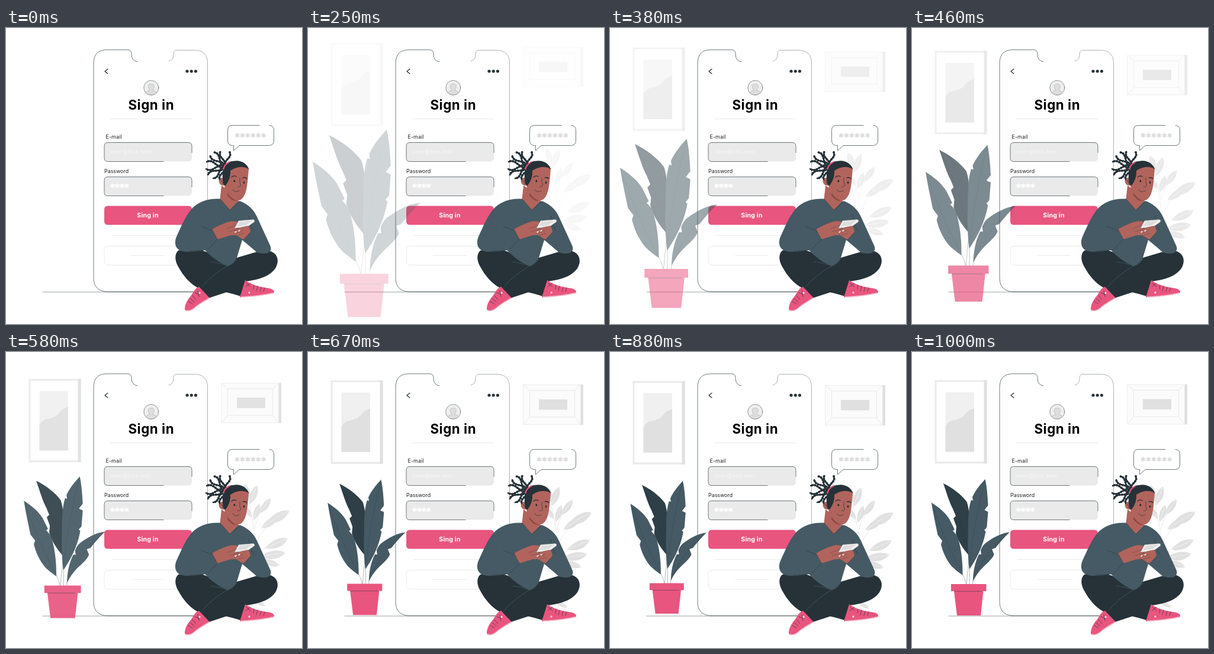
Animation of 500x500 px, one loop 1.04 s. Source, as an HTML page:

```html
<!DOCTYPE html>
<html lang="en">
<head>
<meta charset="utf-8">
<title>Sign in</title>
<style>
html, body { margin: 0; height: 100%; overflow: hidden; background: #fff }
svg { display: block; width: 100vw; height: 100vh; font-family: Inter, sans-serif }
.line { fill: none; stroke: #263238; stroke-width: .65; stroke-linecap: round; stroke-linejoin: round }
.thin { stroke-width: .5 }
.bold { stroke-width: 1.25 }
.pale { fill: none; stroke: #e3e3e3; stroke-width: .75 }
.pink { fill: #e8557f }
.dark { fill: #263238 }
.slate { fill: #455a64 }
.skin { fill: #b1645c }
.grey { fill: #e0e0e0 }
#plant { transform-origin: 98.5px 330px }
</style>
</head>
<body>
<svg viewBox="0 0 500 500">
  <defs>
    <path id="edge" d="M266 225.500H172q-6 0-6-6v-20q0-6 6-6h136q6 0 6 6v11"/>
    <path id="star" d="M0-4V4M-3.5-2l7 4M-3.5 2l7-4"/>
  </defs>

  <g class="drop">
    <path fill="#ebebeb" d="M38.500 47.500h88v141h-88z"/>
    <path class="grey" d="M121.500 47.500h5v141h-5z"/>
    <path fill="#fff" d="M41.500 50.500h80v134.500h-80z"/>
    <path fill="#f0f0f0" d="M56.500 68H105V168.500H56.500z"/>
    <path class="grey" d="M56.500 126C64 113 70 117 78 113C92 109 88 100 105 95V168.500H56.500z"/>
  </g>
  <g class="drop">
    <path fill="#fbfbfb" stroke="#e6e6e6" stroke-width=".7" d="M363.500 55H461V122H363.500z"/>
    <path class="grey" d="M460.500 54.500h4.500v68h-4.500z"/>
    <path class="pale" d="M374.500 64.500h76v45h-76zM364 55l10.500 9.500M460 55l-9.500 9.500M364 122l10.500-12.500M460 122l-9.500-12.500"/>
    <path class="grey" d="M390 79.500h48v17.500h-48z"/>
  </g>
  <g class="drop" id="shrub">
    <path class="pale" d="M420 440C433 390 424 320 411 258M424 322Q435 300 452 285M427 350Q436 330 450 325M420 300Q425 280 437 262"/>
  </g>

  <path class="line" stroke-opacity=".7" d="M62 446H320"/>
  <path class="line" d="M318 445.500H170Q148 444 148 422V60Q148 37 170 36.800H207Q212 38 212 44Q212 56 222 57"/>
  <path class="line thin" stroke-opacity=".75" d="M275 56Q283 54 283 45Q283 37.500 288 37.500H318Q340.500 37.500 340.500 60V330"/>
  <path class="line bold" d="M172 69.300L167 73.200L172 77.200"/>
  <g class="dark"><circle cx="306" cy="73" r="2.600"/><circle cx="313.200" cy="73" r="2.600"/><circle cx="320.400" cy="73" r="2.600"/></g>
  <circle class="line thin" cx="245.300" cy="101" r="12.500" style="fill:#efefef"/>
  <path d="M236 109.500Q238 106 243 105.500C239 100 239 94.500 245.300 94.500S251.600 100 247.600 105.500Q253 106 254.600 109.500Q245 116 236 109.500z" fill="#dedede" stroke="#aaa" stroke-width=".6"/>
  <text x="245.300" y="137.500" text-anchor="middle" font-size="22.300" font-weight="700" letter-spacing=".55">Sign in</text>
  <path class="pale" d="M176 153.500H314M178 350.500H309M211 384.500H268"/>

  <g font-size="8.900" fill="#222"><text x="168.500" y="187" letter-spacing=".1">E-mail</text><text x="166" y="245">Password</text></g>
  <g fill="#eaeaea"><rect x="166" y="193.500" width="148" height="32" rx="6"/><rect x="166" y="251.500" width="148" height="32" rx="6"/></g>
  <use href="#edge" class="line"/><use href="#edge" class="line" y="58"/>
  <text x="176" y="212" font-size="9" letter-spacing=".6" fill="#f7f7f7">user@box.test</text>
  <g class="stars" data-x="180" data-y="266.500" data-step="7.900" data-count="4" stroke="#fff" stroke-width="1.500"></g>
  <rect class="pink" x="166" y="300.500" width="148" height="32" rx="5.500"/>
  <text x="239.500" y="320" text-anchor="middle" font-size="10.600" font-weight="700" fill="#fff" letter-spacing=".2">Sing in</text>
  <rect class="pale" x="166" y="368.500" width="148" height="32" rx="6"/>

  <path class="line" style="fill:#fff" d="M428 164.500H382.500Q374.500 164.500 374.500 172.500V190Q374.500 198 382.500 198.500H384.500V207L394 198.500H444.500Q452.500 198 452.500 190V172.500Q452.500 165 445 164.500"/>
  <g class="stars" data-x="390.500" data-y="181.300" data-step="8.950" data-count="6" stroke="#dcdcdc" stroke-width="2"></g>

  <g id="plant">
    <path class="line thin" d="M92 393Q90 384 85 374M97 393Q98 378 97 362M102.500 393Q102 388 104 382M92 393L97 340" stroke-opacity=".7"/>
    <path fill="#2f3f47" d="M53 222C66 228 83 240 92.500 253C99 270 99 312 96.700 344C87 334 78 320 74 306L75 295L70 281L74 277L69 265C64 256 59 240 53 222z"/>
    <path class="slate" d="M33 254.500C45 262 56 271 63 282L72 300L69 302L76 310C82 325 86 350 85.500 377C77 371 72 367 67 362C58 351 52 338 49 325L51 319L43.500 309C40 292 35 270 33 254.500z"/>
    <path class="slate" d="M123.500 215C126 224 127.500 240 128.500 259L122.300 267L128.500 270L126.400 296L122 301L124.400 303C122 318 115 341 97 367C94 345 94 325 94.700 311C95 290 94 268 99.800 250L103 251L102 245C107 234 115 224 123.500 215z"/>
    <path class="slate" d="M164.500 304.500C155 314 149 321 141 331L135 333L138.700 342C132 357 115 362 103 387.700C103 372 106 356 113 342L117 342L116 335Q119 327 124 323C136 314 150 306 164.500 304.500z"/>
    <path class="line thin" stroke-opacity=".45" d="M33 254.500Q55 319 85 374M53 222Q80 270 96.500 342M123.500 215Q104 290 97 364M164 305Q121 340 103.500 386"/>
    <path class="pink" d="M66 392H125.500V404H120.500L116 445H76L71 404H66z"/>
    <path class="line thin" d="M72 404.200H117"/>
  </g>

  <g id="person">
    <path class="dark" d="M291 376C312 368 335 375 350 384L390 388L424 378L446 377C460 381 462 395 455 406C446 419 428 425 405 428L396 453Q384 449 372 446.500L343 456L324 439C310 431 299 418 292 405C285 394 284 382 291 376z"/>
    <path fill="none" stroke="#455a64" stroke-width=".8" d="M374 402Q349 416 331 437M374 402Q384 400 390 389M345 395Q362 397 374 402"/>
    <path class="pink" d="M326 437L344 456C336 462 326 466 318 473C312 479 304 480 302 475C302 467 306 460 311 454C317 447 317 441 326 437z"/>
    <path class="pink" d="M404 426C412 432 425 437 440 439C451 440 455 444 452 448C440 451 415 454 395 455z"/>
    <path fill="none" stroke="#f7b4c7" stroke-width="1.500" d="M343 456C334 462 326 466 318 473Q310 479 304 477M397 454.300Q425 453.500 452 447.500"/>
    <path class="line" d="M308 462l7 4M311 457l7 6M315 452l6 7M319 447l7 3M324 444l2 10M413 431l-8 6M419 434l-1 7M425 436l-2 8M431 438l-2 7M437 439l-2 6M406 431l7 6"/>
    <g fill="#fbd5df"><circle cx="327" cy="447.500" r="1.700"/><circle cx="411" cy="447" r="1.700"/></g>

    <path class="slate" d="M363 289C345 287 329 292 317 302C305 313 295 337 287 355C283 369 290 378 306 378Q324 378 336 375C346 386 360 397 375 402Q386 397 390 388L399 358L424 379C443 385 451 377 446 367L424 319C418 306 410 299 397 293z"/>
    <path class="skin" d="M364 266L361.500 288.500L378 307.500L393 292L390 284z"/>
    <path class="skin" d="M369 255C364 250 358 255 360 261Q362 267 369 266C371 281 381 291.500 391 291.500C402 291 406 278 408 260L410 238C402 231 386 232 377 240z"/>
    <path d="M374 278Q381 289 390 291.500Q383 294 374 283z" fill="#8f4944"/>
    <path class="dark" d="M367 263C363 237 369 226 383 225C398 222 407 230 410.500 238.500C399 232 388 235 379 241Q380 254 371 266Q368 266 367 263z"/>
    <g id="dreads" class="line"></g>
    <path fill="none" stroke="#e8557f" stroke-width="2.200" d="M367 239Q369 230 378 226"/>
    <g class="dark"><ellipse cx="385.800" cy="258.500" rx="1.500" ry="2"/><ellipse cx="402" cy="261" rx="1.400" ry="1.900"/></g>
    <path class="line bold" d="M381 252Q385 248.500 389 251M400 253Q404 251.500 407 254.500"/>
    <path class="line" d="M395 253Q394 261 396.500 266Q395 269 391 268M383 273Q386 279 394 275M363 258q4 0 3 5"/>
    <path class="line thin" d="M361.500 288.500L378 307.500L396 292M347 342L330 335M357 357Q350 364 341 374M410 317Q412 331 418 341M336 375Q324 377 310 377"/>

    <path class="skin" d="M348 340Q362 332 374 328C385 324 396 327 396 334L389 340L392 345Q390 351 380 350L357 357z"/>
    <path d="M393 325.500L418 323.500Q421 324.500 419.500 327.500L407 336.500L386 338z" fill="#f2f2f2" stroke="#999" stroke-width=".6"/>
    <path d="M395 327L416 325.500L405 333.500L390 335z" fill="#ddd"/>
    <path class="skin" d="M386 342L397 336.500L409 334C414.500 341 414 350 409 356Q402 360 394 353L385 348z"/>
    <path class="line thin" stroke-opacity=".6" d="M373 339L389 333M376 344L391 340M389 346L400 342M391 350L402 347"/>
    <path stroke="#fff" stroke-width="1.500" stroke-linecap="round" d="M387 345l2-1M393 343l2-1"/>
    <path class="slate" d="M413 345L401 358L425 380L438 360z"/>
    <path class="line thin" d="M413 345L401 358M348 340L357 357"/>
  </g>
</svg>
<script>
const $ = id => document.getElementById(id);
const add = (host, html) => host.insertAdjacentHTML('beforeend', html);

for (const row of document.querySelectorAll('.stars')) {
  const { x, y, step, count } = row.dataset;
  for (let i = 0; i < count; i++)
    add(row, `<use href="#star" x="${+x + i * step}" y="${y}"/>`);
}

// Leaves run from base to tip, bulging by a share of their length.
const leaves = [
  [411, 260, 424, 227], [411, 254, 402, 224], [418, 287, 428, 258], [428, 275, 447, 249],
  [440, 291, 479, 270], [431, 300, 460, 280], [438, 334, 476, 317],
  [430, 348, 472, 341], [432, 353, 462, 363], [415, 282, 402, 262], [420, 422, 438, 431]
];
for (const [x, y, u, v] of leaves) {
  const bend = k => `${x + (u - x) * .55 - (v - y) * k} ${y + (v - y) * .55 + (u - x) * k}`;
  add($('shrub'), `<path class="grey" d="M${x} ${y}Q${bend(.36)} ${u} ${v}Q${bend(-.3)} ${x} ${y}"/>
    <path d="M${x} ${y}L${u} ${v}" stroke="#fff" stroke-width=".5"/>`);
}

// Each lock is a wavy strand with round knots along it.
const tips = [[378, 210], [362, 209], [352, 210], [345, 216], [339, 226], [338, 238], [341, 248], [350, 254], [361, 256]];
tips.forEach(([u, v], i) => {
  const x = 370, y = 234, dx = u - x, dy = v - y, k = i % 2 ? .3 : -.3;
  const d = `M${x} ${y}C${x + dx / 3 - dy * k} ${y + dy / 3 + dx * k} ${x + dx * .67 + dy * k} ${y + dy * .67 - dx * k} ${u} ${v}`;
  add($('dreads'), `<path d="${d}" style="stroke-width:2.600"/><path d="${d}" style="stroke-width:4" stroke-dasharray="0 4.500"/>`);
});

// cubic-bezier(.36, -.01, .5, 1.38), solved by bisection
const bezier = (s, a, b) => 3 * (1 - s) ** 2 * s * a + 3 * (1 - s) * s * s * b + s ** 3;
function ease(t) {
  let lo = 0, hi = 1;
  for (let i = 0; i < 30; i++) {
    const mid = (lo + hi) / 2;
    if (bezier(mid, .36, .5) < t) lo = mid; else hi = mid;
  }
  return bezier(hi, -.01, 1.38);
}

const LOOP = 1040, RATE = 24, LAST = 23;
const drops = document.querySelectorAll('.drop');
const start = performance.now();

function draw() {
  const time = (performance.now() - start) % LOOP;
  const step = Math.min(LAST, Math.floor((time + 10) * RATE / 1000));
  const p = ease(step / LAST), opacity = Math.max(0, Math.min(1, p));
  for (const el of drops) {
    el.setAttribute('transform', `translate(0 ${-30 * (1 - p)})`);
    el.setAttribute('opacity', opacity);
  }
  $('plant').style.transform = `scale(${1.5 - .5 * p})`;
  $('plant').style.opacity = opacity;
  requestAnimationFrame(draw);
}
draw();
</script>
</body>
</html>
```
